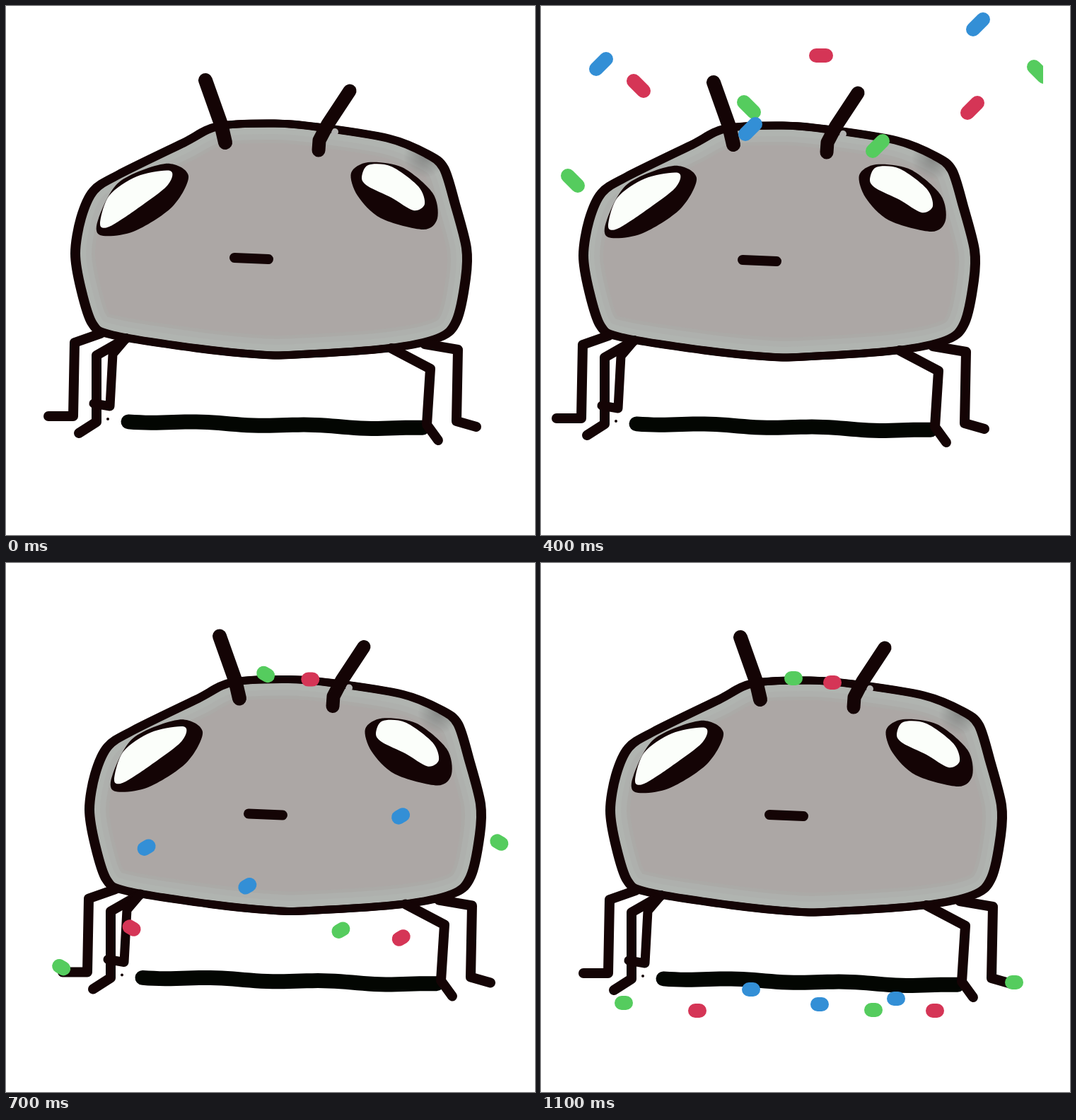
An HTML page with a canvas for the animation above (1.2 s loop, 748 by 748 pixels).

```html
<!DOCTYPE html>
<html>
<head>
<meta charset="utf-8">
<title>Bug and confetti</title>
<style>
html, body { margin: 0; width: 100%; height: 100%; overflow: hidden; background: #fff; }
canvas { display: block; }
</style>
</head>
<body>
<canvas id="stage" width="748" height="748"></canvas>
<script>
const ctx = document.getElementById('stage').getContext('2d');
const SIZE = 748, INK = '#140405', RED = '#d53556', GREEN = '#55cc5e', BLUE = '#338fd6';

// Closed curve through the given points.
function loop(...p) {
  const path = new Path2D(), n = p.length / 2, bend = 0.15;
  const at = (i, axis) => p[(i + n) % n * 2 + axis];
  const handle = (i, side) => [0, 1].map(axis =>
    at(i, axis) + side * bend * (at(i + 1, axis) - at(i - 1, axis)));
  path.moveTo(p[0], p[1]);
  for (let i = 0; i < n; i++) {
    path.bezierCurveTo(...handle(i, 1), ...handle(i + 1, -1), at(i + 1, 0), at(i + 1, 1));
  }
  path.closePath();
  return path;
}

function fill(path, color) {
  ctx.fillStyle = color;
  ctx.fill(path);
}

function stroke(path, color, width) {
  ctx.strokeStyle = color;
  ctx.lineWidth = width;
  ctx.stroke(path);
}

function line(color, width, ...p) {
  const path = new Path2D();
  for (let i = 0; i < p.length; i += 2) path.lineTo(p[i], p[i + 1]);
  stroke(path, color, width);
}

const dot = (color, x, y, r) => line(color, 2 * r, x, y, x + 0.01, y);

const shell = loop(300,170, 380,166, 440,171, 540,187, 595,209, 619,229, 635,280, 651,342,
  650,385, 637,445, 612,469, 540,484, 410,493, 360,493, 270,484, 150,465, 122,449,
  106,400, 98,350, 106,300, 124,261, 160,238, 250,194);
const leftEye = loop(131,300, 160,249, 225,223, 258,240, 235,284, 180,319, 133,324);
const leftShine = loop(133,308, 146,268, 185,241, 232,233, 228,254, 185,287, 146,312);
const rightEye = loop(488,236, 512,221, 560,228, 603,264, 610,300, 590,316, 530,300, 497,268);
const rightShine = loop(503,243, 512,225, 545,227, 583,255, 592,280, 576,289, 545,271, 512,255);

function drawShadow() {
  const wave = [];
  for (let x = 173; x <= 590; x += 8) {
    wave.push(x, 587 + (x - 173) * 0.026 + 1.5 * Math.sin(x / 25));
  }
  line('#030602', 21, ...wave);
}

function drawShell() {
  fill(shell, '#aca7a5');
  ctx.save();
  ctx.clip(shell);
  stroke(shell, '#abaaa7', 56);
  stroke(shell, '#aeb0ad', 46);
  stroke(shell, '#b0b4b0', 30);
  const shade = ctx.createRadialGradient(592, 213, 2, 592, 213, 30);
  shade.addColorStop(0, '#6668');
  shade.addColorStop(1, '#6660');
  fill(shell, shade);
  ctx.restore();
  // Two shifted strokes make the sides heavier than the top.
  for (const side of [-1.5, 1.5]) {
    ctx.translate(side, 0);
    stroke(shell, INK, 11);
    ctx.translate(-side, 0);
  }
  dot('#b2b2b1', 465, 178, 5);
}

function drawBug() {
  drawShadow();
  drawShell();
  line(INK, 14, 134,463, 97,476, 95,580, 60,580);
  line(INK, 14, 170,470, 128,494, 128,588, 103,604);
  line(INK, 13, 168,472, 151,492, 147,566, 124,562);
  line(INK, 14, 545,484, 600,513, 595,592, 611,614);
  line(INK, 14, 592,478, 639,486, 637,587, 665,595);
  dot(INK, 144, 584, 2);
  line(INK, 20, 282,105, 304,167, 310,193);
  line(INK, 19, 486,120, 455,167, 443,190, 442,204);
  line(INK, 14, 323,356, 371,358);
  fill(leftEye, INK);
  fill(rightEye, INK);
  fill(leftShine, '#fbfefa');
  fill(rightShine, '#fbfefa');
}

const mix = (a, b, u) => a.map((v, i) => v + (b[i] - v) * u);

// Beats last 200 ms. The bug dances left, then right, then settles.
const dance = [[0, 0], [0, 0], [-38, 3], [6, -3], [34, 0], [18, 1], [0, 0]];
const sway = beat => mix(dance[Math.floor(beat)], dance[Math.ceil(beat)], beat % 1);

// Colour, tilt, then the places at beats 1, 2 and 3 and the resting place.
const falling = [
  [GREEN, 1, [2, 58], [45, 247], [50, 535], [117, 622]],
  [RED, 1, [146, 6], [138, 113], [146, 431], [221, 633]],
  [BLUE, -1, [334, 7], [296, 174], [303, 335], [394, 624]],
  [GREEN, -1, [456, 11], [476, 198], [476, 437], [470, 632]],
  [RED, -1, [668, 16], [610, 144], [560, 455], [557, 633]],
  [BLUE, -1, [85, -60], [85, 82], [127, 256], [297, 603]],
  [BLUE, -1, [637, -60], [618, 26], [599, 170], [502, 616]],
  [GREEN, 1, [690, -60], [704, 93], [718, 251], [669, 593]]
];
// These land on the bug and ride along.
const riding = [
  [GREEN, 1, [276, 22], [332, 140], [340, 156], [357, 163]],
  [RED, 0, [434, -40], [434, 67], [409, 164], [412, 169]]
];

function drawChip([color, tilt, enter, drop, touch, rest], beat) {
  if (beat < 1) return;
  const landed = 1 - (1 - Math.max(0, beat - 3) / 3) ** 3;
  const [x, y] = beat < 2 ? mix(enter, drop, beat - 1)
    : beat < 3 ? mix(drop, touch, beat - 2)
    : mix(touch, rest, landed);
  const dx = 3 + 4 * Math.max(0, 3 - beat);
  const dy = dx * tilt * (1 - landed);
  line(color, 20, x - dx, y - dy, x + dx, y + dy);
}

function draw(now) {
  const step = Math.floor(now % 1200 / 100);
  const beat = step === 11 ? 6 : step / 2;
  const [x, y] = sway(beat);
  ctx.fillStyle = '#fff';
  ctx.fillRect(0, 0, SIZE, SIZE);
  ctx.save();
  ctx.lineCap = ctx.lineJoin = 'round';
  ctx.beginPath();
  ctx.rect(x, y, SIZE, SIZE);
  ctx.clip();
  ctx.save();
  ctx.translate(x, y);
  drawBug();
  riding.forEach(chip => drawChip(chip, beat));
  ctx.restore();
  falling.forEach(chip => drawChip(chip, beat));
  ctx.restore();
}

const start = performance.now();
function tick() {
  draw(performance.now() - start);
  requestAnimationFrame(tick);
}
tick();
</script>
</body>
</html>
```
